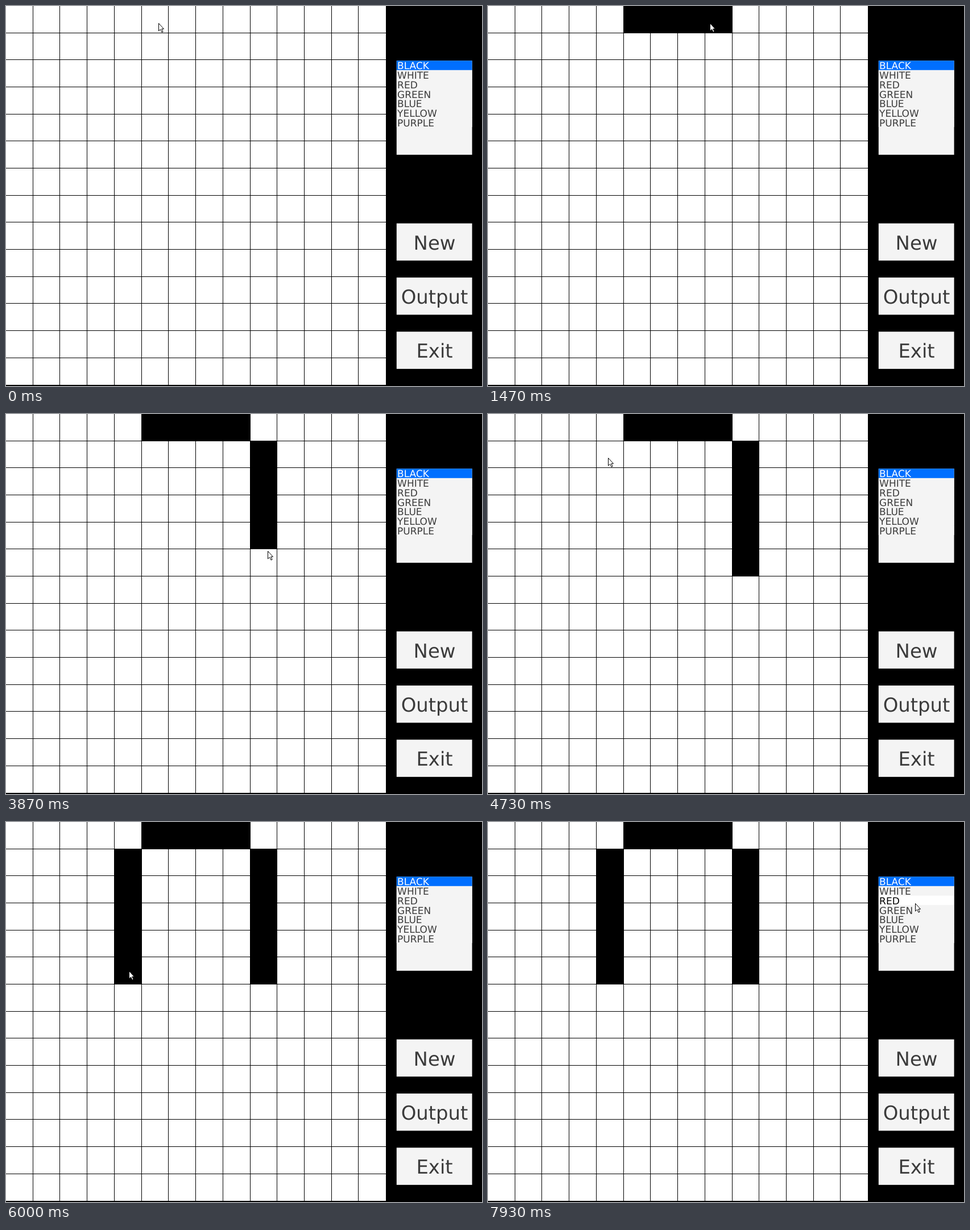
An HTML page with a canvas for the animation above (8 s loop, 837 by 669 pixels).

```html
<!DOCTYPE html>
<html lang="en">
<head>
<meta charset="utf-8">
<title>Grid painter</title>
<style>
  html, body { margin: 0; width: 100%; height: 100%; overflow: hidden; background: #000; }
  canvas { display: block; }
</style>
</head>
<body>
<canvas id="stage" width="837" height="669"></canvas>
<script>
const ctx = document.getElementById('stage').getContext('2d');
const LOOP = 8000, STEP = 200 / 3, CELLS = 14;
const COLORS = ['BLACK', 'WHITE', 'RED', 'GREEN', 'BLUE', 'YELLOW', 'PURPLE'];
const BUTTONS = ['New', 'Output', 'Exit'];
const LIST = { x: 686.8, y: 96.2, w: 132.8, h: 165.7, row: 16.7 };

const linear = u => u;
const easeIn = u => u ** 3;
const easeOut = u => u * (2 - u);
const easeBoth = u => u * u * (3 - 2 * u);

// Pointer moves, timed in steps; a drag paints the cells it crosses
const START = { x: 268, y: 30 };
const MOVES = [
  { from: 3, to: 7, x: 278, y: 30, ease: linear },
  { from: 10, to: 19, x: 379, y: 30, ease: linear, drag: true },
  { from: 21, to: 24, x: 411, y: 30, ease: linear, drag: true },
  { from: 43, to: 46, x: 462, y: 77, ease: easeIn },
  { from: 49, to: 60, x: 460, y: 277, ease: linear, drag: true },
  { from: 61, to: 72, x: 205, y: 72, ease: easeBoth },
  { from: 74, to: 85, x: 211, y: 267, ease: easeOut, drag: true },
  { from: 89, to: 92, x: 226, y: 253, ease: linear },
  { from: 106, to: 119, x: 751, y: 143, ease: easeBoth }
];

const lineX = i => Math.floor(i * 47.72 - 0.46);
const lineY = i => Math.floor(i * 47.66 - 0.45);

function pointerAt(step) {
  let { x, y } = START;
  for (const move of MOVES) {
    if (step <= move.from) break;
    const u = move.ease(Math.min(1, (step - move.from) / (move.to - move.from)));
    x += (move.x - x) * u;
    y += (move.y - y) * u;
  }
  return { x: Math.round(x), y: Math.round(y) };
}

function box(x, y, w, h, color) {
  ctx.fillStyle = color;
  ctx.fillRect(x, y, w, h);
}

function label(text, x, y, size, color, align) {
  ctx.font = `${size}px "DejaVu Sans", sans-serif`;
  ctx.textRendering = 'geometricPrecision';
  ctx.textAlign = align;
  ctx.fillStyle = color;
  ctx.fillText(text, x, y);
}

function paintCell({ x, y }) {
  const col = Math.floor(x / 47.7), row = Math.floor(y / 47.7);
  const left = Math.max(0, lineX(col)), top = Math.max(0, lineY(row));
  box(left, top, lineX(col + 1) - left + 1, lineY(row + 1) - top + 1, '#000');
}

function drawGrid(step) {
  box(0, 0, 668, 667, '#fff');
  for (let i = 1; i < CELLS; i++) {
    box(lineX(i), 0, 1, 668, '#000');
    box(0, lineY(i), 668, 1, '#000');
  }
  // Paint trails the pointer by half a step
  for (const { from, to, drag } of MOVES) {
    for (let s = from; drag && s <= Math.min(to, step); s++) paintCell(pointerAt(s - 0.5));
  }
}

function drawPanel(pointer) {
  const { x, y, w, h, row } = LIST;
  const hover = pointer.x >= x ? Math.floor((pointer.y - y) / row) : -1;
  box(x, y, w, h, '#f4f4f4');
  COLORS.forEach((name, i) => {
    const [back, ink] = i === 0 ? ['#006fff', '#fff']
      : i === hover ? ['#fff', '#000'] : ['#f4f4f4', '#3b3b3b'];
    box(x, y + i * row, w, row, back);
    label(name, x + 1.3, 111.4 + i * row, 17, ink, 'left');
  });
  BUTTONS.forEach((name, i) => {
    const top = 382.7 + i * 95.33;
    box(x, top, w, 65.5, '#f4f4f4');
    label(name, x + w / 2 + 0.3, top + 46, 33.9, '#3b3b3b', 'center');
  });
}

function drawPointer({ x, y }) {
  const arrow = new Path2D('M0 0V13.5L3.1 10.6L5.5 15.7L7.6 14.7L5.3 9.8H9Z');
  ctx.save();
  ctx.translate(x + 0.5, y + 0.5);
  ctx.fillStyle = '#fff';
  ctx.strokeStyle = '#000';
  ctx.fill(arrow);
  ctx.stroke(arrow);
  ctx.restore();
}

function draw() {
  const step = Math.floor((performance.now() % LOOP + 4) / STEP);
  const pointer = pointerAt(step);
  box(0, 0, 837, 669, '#000');
  drawGrid(step);
  drawPanel(pointer);
  drawPointer(pointer);
  requestAnimationFrame(draw);
}
draw();
</script>
</body>
</html>
```
